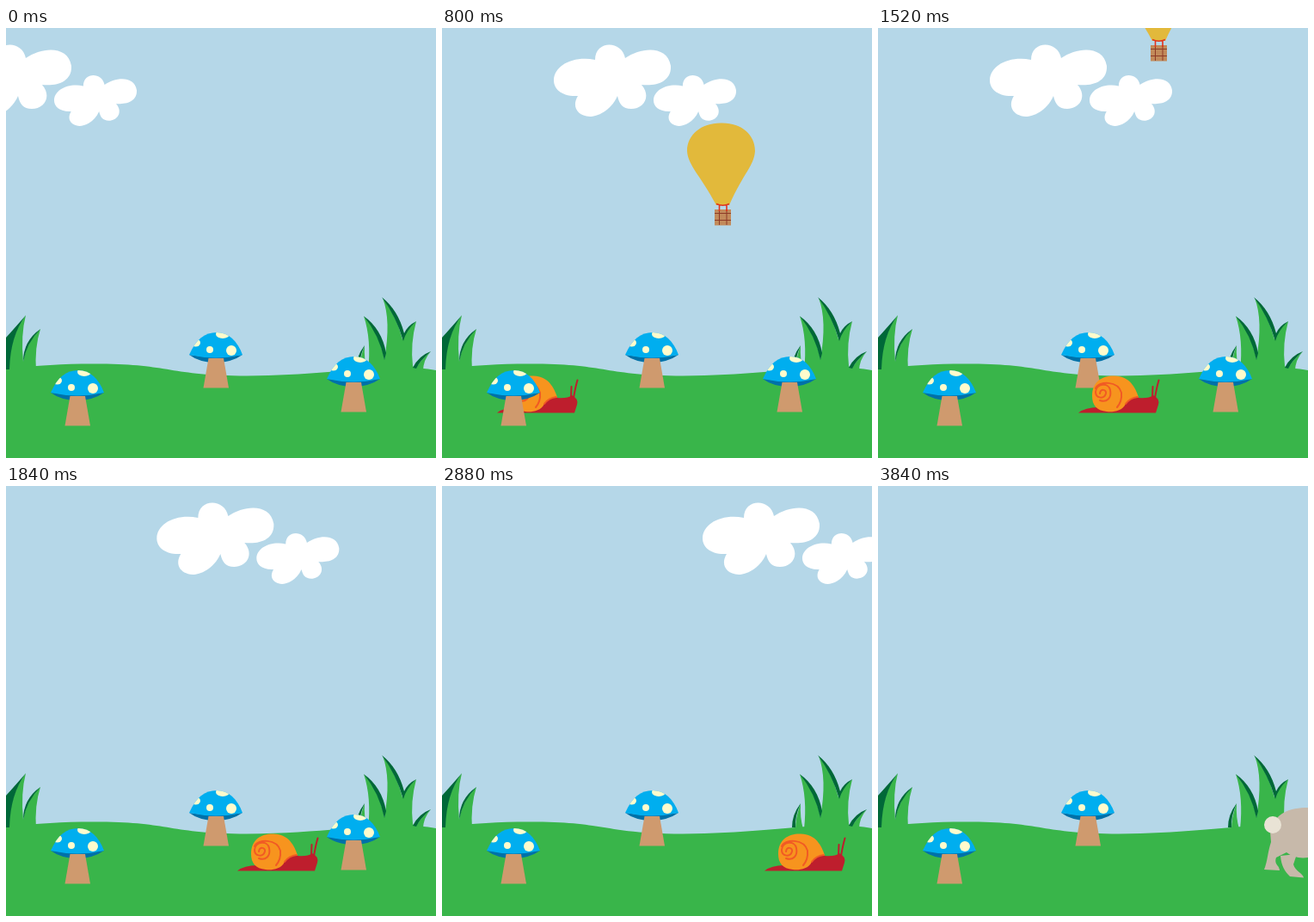
Animation of 500x500 px, one loop 3920 ms. Source, as an HTML page:

```html
<!DOCTYPE html>
<html lang="en">
<head>
<meta charset="utf-8">
<title>Meadow</title>
<style>
html, body { margin: 0; width: 100%; height: 100%; overflow: hidden; background: #b5d7e8; }
svg { display: block; width: 100vw; height: 100vh; }
.leaf { fill: #39b54a; }
.shade { fill: #006838; }
.fur { fill: #c7b9aa; }
.red { fill: #be1e2d; }
</style>
</head>
<body>
<svg viewBox="0 0 500 500">
  <defs>
    <path id="cloud" fill="#fff" d="M178 37C178 14 209 14 213 35C232 22 262 20 266 44C267 62 250 68 232 66C244 80 234 94 220 94C210 94 206 88 204 79C196 97 180 103 172 103C156 102 151 90 158 79C138 80 130 70 130 61C130 44 152 32 178 37Z"/>
    <path id="cap" d="M52 424C60 406 70 398 84 398C98 398 108 408 114 424Q83 431 52 424Z"/>
    <clipPath id="capClip"><use href="#cap"/></clipPath>
    <g id="mushroom">
      <path fill="#0071a8" d="M52 424Q83 429 114 424Q101 433 83 433Q64 433 52 424Z"/>
      <use href="#cap" fill="#00aeef"/>
      <g fill="#fffbcc" clip-path="url(#capClip)">
        <ellipse cx="59.5" cy="410" rx="5.5" ry="4.5"/>
        <ellipse cx="91" cy="400" rx="8" ry="5"/>
        <circle cx="76" cy="418" r="4"/>
        <circle cx="101" cy="419" r="6"/>
      </g>
      <path fill="#cf9a6e" d="M74.500 428H92L98 462.500H68.500Z"/>
    </g>
  </defs>

  <rect width="500" height="500" fill="#b5d7e8"/>

  <g id="clouds">
    <use href="#cloud"/>
    <use href="#cloud" transform="translate(154.2 41.3) scale(.706)"/>
  </g>

  <g id="balloon">
    <path fill="#e2b93b" d="M325 110.500C348 110 364 124 364 143C363 160 351 168 334 206H319C301 172 286 160 285 143C285 124 302 110 325 110.500Z"/>
    <rect x="317" y="211" width="19" height="18.500" fill="#c28a5a"/>
    <path stroke="#8e3b27" fill="none" d="M317 215.500H336M317 223.500H336M322.500 211V229M331 211V229"/>
    <path stroke="#e0341f" stroke-width="1.600" fill="none" d="M319 204.500Q326.500 208 334 204.500M322.500 205V213M331 205V213"/>
  </g>

  <path class="leaf" d="M0 396C40 392 75 390 110 390.500C190 391 190 404 280 404.500C350 404 400 397 440 395Q475 393 500 398V500H0Z"/>

  <g class="leaf">
    <path d="M3 399Q4 358 23 334Q17 357 20 388Q24 365 40 350Q33 372 35 399Z"/>
    <path d="M421 399Q425 362 416 335Q434 355 440 385Q448 340 438 314Q454 335 461 362Q466 350 477 341Q470 367 473 393L476 397Q481 387 494 376Q485 386 485 399Z"/>
    <path d="M411 399Q411 385 417 369Q416 385 420 399Z"/>
  </g>
  <g class="shade">
    <path d="M0 360Q10 349 23 334Q5 358 4 397H0Z"/>
    <path d="M20 388Q20 364 40 350Q24 366 20 388Z"/>
    <path d="M416 335Q437 350 442 378L440 386Q434 357 416 335Z"/>
    <path d="M437 313Q456 328 463 355Q467 346 477 341Q465 352 462 364Q454 336 437 313Z"/>
    <path d="M473 395Q480 381 494 376Q481 387 477 396Z"/>
    <path d="M407 397Q407 382 417 369Q410 385 411 397Z"/>
  </g>

  <use href="#mushroom" x="161" y="-44"/>
  <use href="#mushroom" x="321" y="-16" id="snack"/>

  <g id="snail">
    <path class="red" d="M233 447.500Q241 441 256 441L284 436Q292 429 303 430Q315 431 320 427Q328 431 326 438L323 447.500Z"/>
    <g id="stalks" stroke="#be1e2d" stroke-width="2" stroke-linecap="round">
      <path d="M319 430L319.500 417M322 430Q324 418 326.500 409.500"/>
    </g>
    <path id="mouth" class="red" d="M318 447L316 432C328 420 328 382 357.500 376C350 396 350 428 362 447.500Z"/>
    <path fill="#f7941e" d="M249 428C249 410 262 404 275 404.500C293 405 299 418 303 429Q293 430 288 437C284 446 272 447 266 446C254 445 249 438 249 428Z"/>
    <path fill="none" stroke="#f15a24" stroke-width="2" stroke-linecap="round" d="M258 425C259 419 266 420 265 425C263 432 253 431 253 423C254 413 268 412 270 421C272 430 266 436 258 433M253 419C257 410 279 410 283 424Q284 434 278 441M288 437Q293 430 302 429"/>
  </g>

  <use href="#mushroom"/>

  <g id="rabbit">
    <path fill="#80613f" d="M108-38Q118-44 119-32Q119-14 112-5L107-8Z"/>
    <g class="fur">
      <path d="M-3 8C2-14 20-20 41-20C65-20 82-16 94-8C104 10 98 38 76 38H41Q26 40 16 32L4 38C1 46 8 47 8 53L-10 52C-6 42-6 32-2 20Z"/>
      <path d="M9 36C10 48 14 54 20 60L36 61.500C35 56 26 54 24 46L28 34Z"/>
      <path d="M70 28L82 38H108Q107 32 96 26Z"/>
      <path d="M88-8L97-14C94-28 98-40 104-40C111-40 114-26 112-5C126-4 134 10 134 24C134 34 127 39 120 38Q111 37 104 30L88 26Z"/>
    </g>
    <circle r="10" fill="#e9e3d5"/>
  </g>
</svg>
<script>
const LOOP = 3920, STEP = 80;
const el = id => document.getElementById(id);
const move = (id, x, y = 0) => el(id).setAttribute("transform", `translate(${x} ${y})`);
const show = (id, on) => el(id).setAttribute("visibility", on ? "visible" : "hidden");
const scaleAt = (id, x, y, sx, sy) =>
  el(id).setAttribute("transform", `translate(${x} ${y}) scale(${sx} ${sy}) translate(${-x} ${-y})`);

// Linear interpolation through [time, value] pairs
function track(t, keys) {
  const i = keys.findIndex(k => k[0] > t);
  if (i === 0) return keys[0][1];
  if (i < 0) return keys[keys.length - 1][1];
  const [t0, a] = keys[i - 1], [t1, b] = keys[i];
  return a + (b - a) * (t - t0) / (t1 - t0);
}

const clouds = [[0, -190], [800, 0], [1520, 0], [2240, 102], [2880, 173], [3280, 236], [3840, 372]];
const balloon = [[0, 300], [800, 0], [1520, -191], [1760, -255]];
const snail = [[0, -357], [800, -169], [1520, 0], [1680, 36], [2480, 36], [2880, 142], [3280, 252], [3520, 318]];
const bite = [[1920, 0], [2240, 1], [2320, 1], [2480, 0]];

function draw(t) {
  move("clouds", track(t, clouds));
  move("balloon", 0, track(t, balloon));
  move("snail", track(t, snail));

  const open = track(t, bite);
  scaleAt("mouth", 318, 447, open, open);
  scaleAt("stalks", 319, 430, 1, 1 - open * 0.4);
  show("mouth", open > 0);
  show("snack", t < 2400);

  const run = (t - 3280) / 560;
  move("rabbit", -92 + 551 * run, 448 - 54 * Math.abs(Math.sin(run * Math.PI * 1.5)));
  show("rabbit", t >= 3200);
}

const start = performance.now();
function tick() {
  const t = (performance.now() - start) % LOOP;
  draw(Math.floor(t / STEP) * STEP);
  requestAnimationFrame(tick);
}
tick();
</script>
</body>
</html>
```
